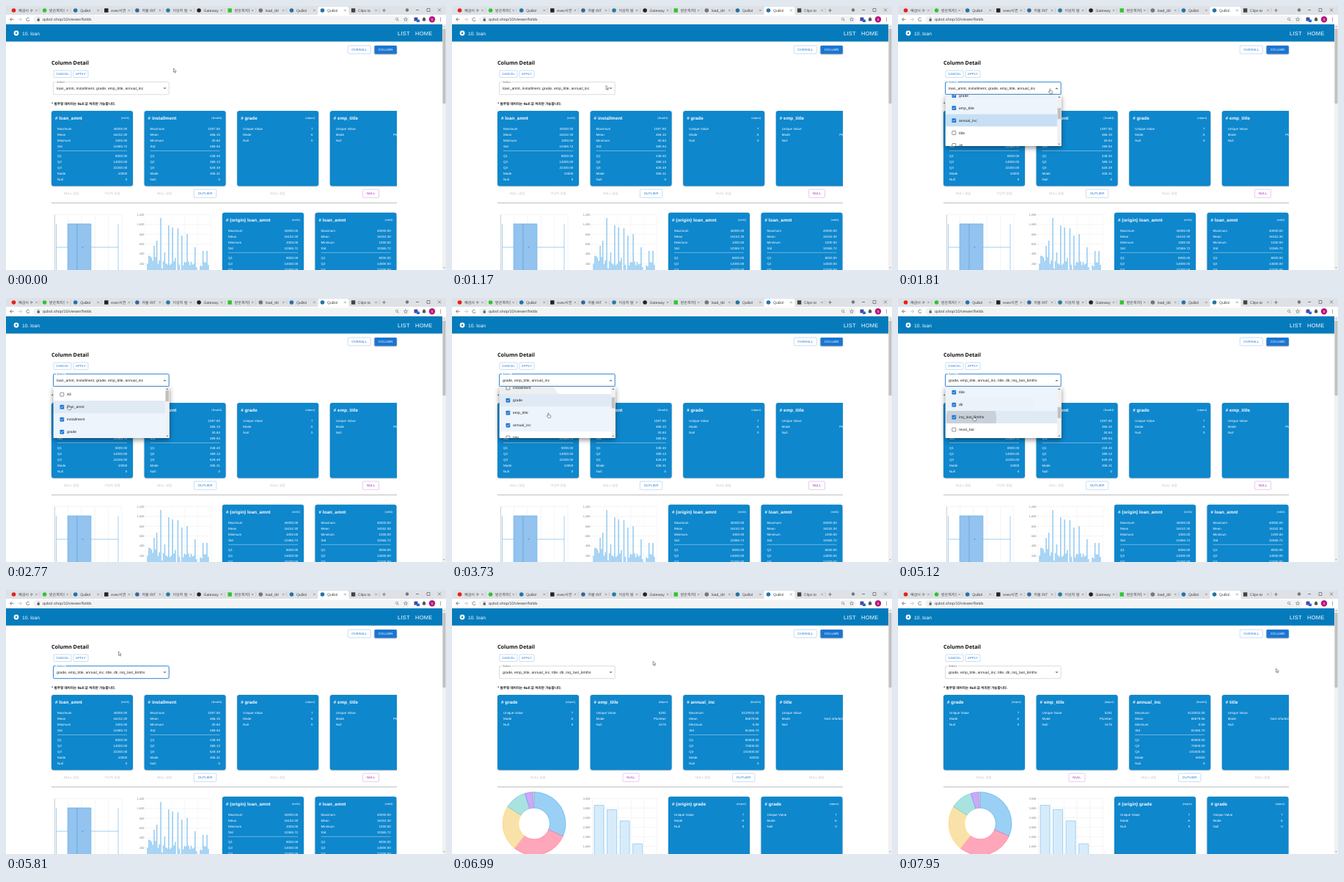
Recreate the animation shown at these times as an HTML page with a canvas. Size 600 by 360 pixels, loop 8 s.

```html
<!DOCTYPE html>
<html lang="ko">
<head>
<meta charset="utf-8">
<title>Column Detail</title>
<style>
html, body { margin: 0; width: 100%; height: 100%; overflow: hidden; background: #fff; }
canvas { display: block; width: 600px; height: 360px; }
</style>
</head>
<body>
<canvas id="stage"></canvas>
<script>
const canvas = document.getElementById('stage');
const ctx = canvas.getContext('2d');
const ratio = window.devicePixelRatio || 1;
canvas.width = 600 * ratio;
canvas.height = 360 * ratio;

const LOOP = 8000;
const SANS = '"Liberation Sans", "Noto Sans CJK KR", "Noto Sans CJK", sans-serif';
const CJK = '"Noto Sans CJK KR", "Noto Sans CJK", sans-serif';
const HEAD = '"Noto Sans", sans-serif';
const BLUE = '#1976d2', CARD = '#0e87cd', INK = '#222';
const CONTENT_RIGHT = 533;

// Timing of the session
const OPEN = 1660, CLOSE = 5420, BLUR = 6250, APPLY = 6900;
const CLICKS = [[2900, 1], [3350, 2], [4300, 6], [4620, 7], [4960, 8]];
const CURSOR = [
  [0, 230, 88], [500, 230, 88], [1400, 208, 116], [1900, 208, 116], [2400, 112, 142],
  [2700, 86, 149], [3000, 86, 149], [3250, 92, 166], [3430, 92, 166], [3720, 132, 160],
  [4200, 108, 129], [4340, 108, 129], [4520, 106, 146], [4700, 106, 146], [4880, 104, 164],
  [5140, 104, 164], [5400, 150, 90], [5820, 155, 87], [6120, 101, 93], [6500, 101, 93],
  [7600, 517, 110], [8000, 517, 110]
];
const SCROLL = [[0, 60.5], [2050, 60.5], [2500, 0], [3480, 0], [3680, 43], [3800, 43], [4150, 105], [8000, 105]];

const COLUMNS = ['All', 'loan_amnt', 'installment', 'grade', 'emp_title', 'annual_inc', 'title', 'dti',
  'inq_last_6mths', 'revol_bal', 'revol_util', 'total_acc', 'term', 'purpose', 'int_rate'];

const STATS = ['Maximum', 'Mean', 'Minimum', 'Std', 'Q1', 'Q2', 'Q3', 'Mode', 'Null'];
const KINDS = ['Unique Value', 'Mode', 'Null'];
const DATA = {
  loan_amnt: ['(int64)', '40000.00 16152.30 1000.00 10365.72 8000.00 14000.00 22200.00 10000 0'.split(' ')],
  installment: ['(float64)', '1597.80 466.10 30.84 289.94 248.40 389.13 628.49 306.31 0'.split(' ')],
  grade: ['(object)', ['7', 'A', '0']],
  emp_title: ['(object)', ['5281', 'Plumber', '1575']],
  annual_inc: ['(float64)', '5119032.00 85679.56 0.00 81465.70 60000.00 70000.00 101000.00 60000 0'.split(' ')],
  title: ['(object)', ['1204', 'Yard refurbishment', '0']]
};

const clamp = v => Math.max(0, Math.min(1, v));
const ease = v => v * v * (3 - 2 * v);

function track(keys, t) {
  let i = 0;
  while (i < keys.length - 2 && t >= keys[i + 1][0]) i++;
  const a = keys[i], b = keys[i + 1];
  const k = ease(clamp((t - a[0]) / (b[0] - a[0])));
  return a.slice(1).map((v, n) => v + (b[n + 1] - v) * k);
}

function rect(x, y, w, h, fill, r = 0) {
  ctx.fillStyle = fill;
  ctx.beginPath();
  ctx.roundRect(x, y, w, h, r);
  ctx.fill();
}

function frame(x, y, w, h, stroke, r = 0, width = 0.6) {
  ctx.strokeStyle = stroke;
  ctx.lineWidth = width;
  ctx.beginPath();
  ctx.roundRect(x, y, w, h, r);
  ctx.stroke();
}

function line(points, stroke, width = 0.6) {
  ctx.strokeStyle = stroke;
  ctx.lineWidth = width;
  ctx.beginPath();
  for (let i = 0; i < points.length; i += 2) ctx.lineTo(points[i], points[i + 1]);
  ctx.stroke();
}

function dot(x, y, r, fill) {
  ctx.fillStyle = fill;
  ctx.beginPath();
  ctx.arc(x, y, r, 0, 7);
  ctx.fill();
}

// y is the middle of the capitals
function text(str, x, y, size, color, { align = 'left', bold = false, font = SANS, space = 0.01 } = {}) {
  ctx.font = `${bold ? 'bold ' : ''}${size}px ${font}`;
  ctx.letterSpacing = size * space + 'px';
  ctx.textRendering = 'geometricPrecision';
  ctx.textAlign = align;
  ctx.fillStyle = color;
  ctx.fillText(str, x, y + size * 0.36);
}

function clipped(x, y, w, h, paint) {
  ctx.save();
  ctx.beginPath();
  ctx.rect(x, y, w, h);
  ctx.clip();
  paint();
  ctx.restore();
}

function shadowed(blur, dy, alpha, paint) {
  ctx.save();
  ctx.shadowColor = `rgba(0,0,0,${alpha})`;
  ctx.shadowBlur = blur * ratio;
  ctx.shadowOffsetY = dy * ratio;
  paint();
  ctx.restore();
}

function button(label, x, y, w, h, size, { color = BLUE, filled = false } = {}) {
  if (filled) shadowed(2, 0.7, 0.4, () => rect(x, y, w, h, color, 1.3));
  else frame(x, y, w, h, color === BLUE ? '#a3c8ed' : '#d7a8df', 1.3);
  text(label, x + w / 2, y + h / 2, size, filled ? '#fff' : color, { align: 'center', space: 0.028 });
}

function browser() {
  rect(0, 0, 600, 12, '#dee1e6');
  const tabs = [['예금시 수', '#e62117'], ['받은쪽지함', '#2fc52f'], ['QuBol', '#2373a8'], ['exec시연', '#222'],
    ['자율 RIT', '#34679a'], ['이상치 탐', '#277da1'], ['Gateway', '#222'], ['받은쪽지함', '#2fc52f'],
    ['load_tbl', '#77767d'], ['QuBol', '#2373a8'], ['QuBol', '#2373a8'], ['Clips to', '#444']];
  tabs.forEach(([label, color], i) => {
    const x = 10.5 + i * 42.1;
    if (i === 10) rect(x - 6, 1, 42, 12, '#fff', [2.5, 2.5, 0, 0]);
    else if (i !== 9) line([x + 35.5, 3, x + 35.5, 9], '#a9adb3', 0.4);
    if (i % 4 === 3) rect(x - 2.7, 3.2, 5.4, 5.6, color, 0.5);
    else dot(x, 6, 2.8, color);
    clipped(x + 6, 0, 21, 12, () => text(label, x + 6.5, 6, 5, '#3c4043'));
    cross(x + 31, 6, 1.3, '#5f6368');
  });
  line([513, 6, 518, 6], '#444');
  line([515.5, 3.5, 515.5, 8.5], '#444');
  dot(547, 5.5, 2.2, '#777');
  line([559, 5.5, 563, 5.5], '#333');
  frame(574, 3.5, 4, 4, '#333', 0, 0.5);
  cross(591, 5.5, 2, '#333');

  rect(0, 12, 600, 13, '#fff');
  rect(37, 13.5, 514, 9.6, '#f1f3f4', 5);
  arrowIcon(8, 18.3, -1, '#555');
  arrowIcon(19, 18.3, 1, '#b8b8b8');
  ctx.strokeStyle = '#555';
  ctx.lineWidth = 0.7;
  ctx.beginPath();
  ctx.arc(30, 18.3, 2.2, 0.3, 5.6);
  ctx.stroke();
  rect(42.6, 17.7, 3.2, 2.7, '#555', 0.3);
  frame(43.3, 16, 1.8, 2.4, '#555', 0.9, 0.5);
  text('qubol.shop/10/viewer/fields', 50, 18.3, 5.4, '#444');
  ctx.beginPath();
  ctx.arc(533, 17.8, 1.6, 0, 7);
  ctx.stroke();
  line([534.2, 19, 535.6, 20.5], '#555');
  star(545, 18.3);
  rect(556.5, 15.5, 5, 5, '#4b45a8', 0.6);
  rect(560, 18.5, 4, 3.6, '#2468d6', 0.5);
  rect(568, 16.5, 4.2, 4, '#555', 0.8);
  dot(570, 16.2, 1, '#555');
  dot(581, 18.3, 4.2, '#b5157e');
  text('S', 581, 18.3, 4.5, '#fff', { align: 'center' });
  for (let i = -1; i < 2; i++) dot(592.5, 18.3 + i * 2, 0.6, '#555');
}

function cross(x, y, r, color) {
  line([x - r, y - r, x + r, y + r], color, 0.5);
  line([x + r, y - r, x - r, y + r], color, 0.5);
}

function arrowIcon(x, y, dir, color) {
  line([x - 2.5 * dir, y, x + 2.5 * dir, y], color, 0.7);
  line([x, y - 2.3, x + 2.5 * dir, y, x, y + 2.3], color, 0.7);
}

function star(x, y) {
  ctx.beginPath();
  for (let i = 0; i < 10; i++) {
    const r = i % 2 ? 1.2 : 2.7, a = i * Math.PI / 5;
    ctx.lineTo(x + r * Math.sin(a), y - r * Math.cos(a));
  }
  ctx.closePath();
  ctx.strokeStyle = '#555';
  ctx.lineWidth = 0.5;
  ctx.stroke();
}

function pageTop() {
  rect(0, 25, 595, 23.5, '#057bbc');
  dot(14, 37, 3.4, '#fff');
  dot(14, 37, 1.2, '#057bbc');
  text('10. loan', 22, 37.3, 6.6, '#fff');
  text('LIST', 534, 37, 7.5, '#fff', { space: 0.03 });
  text('HOME', 558, 37, 7.5, '#fff', { space: 0.03 });
  rect(595, 25, 5, 335, '#f1f1f1');
  rect(595.5, 31, 4, 102, '#c1c1c1');
  triangle(597.5, 28, -1.2, '#777');
  triangle(597.5, 357, 1.2, '#777');

  button('OVERALL', 466.3, 54, 31, 11, 4.375);
  button('COLUMN', 502.5, 54, 30.3, 11.3, 4.375, { filled: true });
  text('Column Detail', 62, 77, 7.2, '#111', { bold: true, font: HEAD, space: 0 });
  button('CANCEL', 65, 88, 24, 9.5, 4.2);
  button('APPLY', 92, 88, 20, 9.5, 4.2);
  text('* 범주형 데이터는 Null 값 처리만 가능합니다.', 62, 133, 4.55, '#111', { bold: true, font: CJK, space: 0 });
}

function triangle(x, y, h, color) {
  const w = Math.abs(h) * 1.25;
  ctx.fillStyle = color;
  ctx.beginPath();
  ctx.moveTo(x - w, y - h / 2);
  ctx.lineTo(x + w, y - h / 2);
  ctx.lineTo(x, y + h / 2);
  ctx.fill();
}

function select(t, chosen) {
  const focus = t >= OPEN - 30 && t < BLUR;
  const open = t >= OPEN && t < CLOSE;
  frame(64.5, 103.7, 157.7, 17, focus ? BLUE : '#c4c4c4', 1.4, focus ? 0.9 : 0.6);
  rect(67.8, 102, 13.5, 3, '#fff');
  text('Select', 69, 103.2, 3.8, focus ? BLUE : '#666');
  text(chosen.map(i => COLUMNS[i]).join(', '), 69, 112, 5, INK);
  triangle(216.5, 112.3, open ? -1.8 : 1.8, '#666');
}

function card(x, y, name, prefix = '') {
  const [type, values] = DATA[name];
  const labels = values.length > 3 ? STATS : KINDS;
  shadowed(2, 0.6, 0.3, () => rect(x, y, 111, 102.5, CARD, 3));
  text('# ' + prefix + name, x + 5, y + 9.9, 6.25, '#fff', { bold: true, space: 0.0075 });
  text(type, x + 106, y + 10, 3.8, '#fff', { align: 'right' });
  labels.forEach((label, i) => {
    const row = y + 24.3 + i * 8.05 + (i > 3 ? 4.6 : 0);
    text(label, x + 8, row, 4.45, '#fff');
    text(values[i], x + 103.3, row, 4.45, '#fff', { align: 'right' });
  });
  if (labels === STATS) line([x + 8, y + 54.5, x + 103, y + 54.5], '#a9d6ef', 0.6);
}

function disabled(label, x) {
  text(label, x, 255.7, 4.4, '#c2c2c2', { align: 'center' });
}

function cards(applied) {
  const names = applied ? ['grade', 'emp_title', 'annual_inc', 'title'] : ['loan_amnt', 'installment', 'grade', 'emp_title'];
  const none = 'NULL 없음';
  clipped(0, 136, CONTENT_RIGHT, 224, () => {
    names.forEach((name, i) => card(62 + i * 126.6, 143, name));
    ['(origin) ', ''].forEach((prefix, i) => card(295 + i * 126.5, 281.8, names[0], prefix));
  });
  const nullButton = x => button('NULL', x, 250, 22, 11.3, 4.375, { color: '#9c27b0' });
  const outlier = x => button('OUTLIER', x, 250, 30.5, 11.3, 4.375);
  if (applied) {
    disabled(none, 117.5);
    nullButton(233);
    disabled(none, 342);
    outlier(382.5);
    disabled(none, 497);
  } else {
    disabled(none, 89);
    disabled('이상치 없음', 145);
    disabled(none, 216);
    outlier(256.3);
    disabled(none, 370.5);
    nullButton(486.5);
  }
  line([62, 268.6, CONTENT_RIGHT, 268.6], '#bcbcbc', 1);
}

function axis(top, step, gap) {
  for (let i = 0; i < 6; i++) {
    const y = 284.5 + i * gap;
    text((top - i * step).toLocaleString('en-US'), 188.5, y, 3.8, '#777', { align: 'right' });
    line([189.5, y, 279.5, y], '#e6e6e6', 0.4);
  }
}

function boxPlot() {
  for (let i = 0; i < 6; i++) line([66.5 + i * 18.3, 284.5, 66.5 + i * 18.3, 360], '#e4e4e4', 0.4);
  line([66.5, 284.5, 158, 284.5], '#e4e4e4', 0.4);
  line([66.5, 284.5, 66.5, 360], '#aaa', 0.5);
  const edge = '#5fb0e8';
  line([68.5, 297, 68.5, 360], edge);
  line([153, 297, 153, 360], edge);
  line([68.5, 329, 153, 329], edge);
  rect(84, 297, 32, 70, '#93c3ee');
  frame(84, 297, 32, 70, edge);
  line([97, 297, 97, 360], '#4a9cd8');
  dot(104.5, 329, 0.9, '#5a9fd4');
}

function histogram() {
  axis(1200, 200, 13.35);
  for (let i = 0; i < 6; i++) line([190 + i * 17.9, 284.5, 190 + i * 17.9, 360], '#eee', 0.4);
  const peaks = { 2: 341, 5: 327, 7: 320, 10: 289, 13: 336, 16: 299, 19: 302, 23: 303, 26: 313, 30: 311, 36: 329, 42: 334, 45: 334 };
  let seed = 17;
  for (let i = 0; i < 48; i++) {
    seed = (seed * 1103 + 377) % 4096;
    const y = peaks[i] || 340 + i * 0.16 + seed / 4096 * 17;
    rect(192.3 + i * 1.8, y, 1.5, 365 - y, '#93caf1');
  }
}

function donut() {
  const parts = [[3150, '#9ad0f5', '#36a2eb'], [2920, '#ffa7ba', '#ff6384'], [2330, '#f9e2a9', '#ffcd56'],
    [1130, '#a9e3df', '#4bc0c0'], [400, '#c9a9fb', '#9966ff'], [70, '#ccd', '#aab']];
  let a = -Math.PI / 2;
  for (const [value, fill, stroke] of parts) {
    const b = a + value / 10000 * Math.PI * 2;
    ctx.beginPath();
    ctx.arc(112, 333 - 14.5, 43, a, b);
    ctx.arc(112, 333 - 14.5, 21.3, b, a, true);
    ctx.closePath();
    ctx.fillStyle = fill;
    ctx.strokeStyle = stroke;
    ctx.lineWidth = 0.5;
    ctx.fill();
    ctx.stroke();
    a = b;
  }
}

function bars() {
  axis(3500, 500, 13);
  for (let i = 0; i < 6; i++) line([191.5 + i * 17.55, 284.5, 191.5 + i * 17.55, 360], '#e6e6e6', 0.4);
  [3150, 2920, 2330, 1130].forEach((value, i) => {
    const y = 284.5 + (3500 - value) * 0.026;
    rect(194 + i * 17.55, y, 13, 370 - y, '#d7ecfb');
    frame(194 + i * 17.55, y, 13, 370 - y, '#6fbcf0', 0, 0.6);
  });
}

function checkbox(x, y, on) {
  if (!on) return frame(x + 0.3, y - 2.5, 5, 5, '#666', 0.6, 0.7);
  rect(x, y - 2.8, 5.7, 5.7, BLUE, 0.7);
  line([x + 1.2, y, x + 2.4, y + 1.3, x + 4.6, y - 1.2], '#fff', 0.75);
}

function menu(t, chosen, cursor) {
  const alpha = clamp((t - OPEN) / 90) * clamp((CLOSE + 90 - t) / 90);
  if (!alpha) return;
  const scroll = track(SCROLL, t)[0];
  let hover = Math.floor((cursor[1] - 123 + scroll) / 17);
  if (t > 3480 && t < 3800) hover = 3;
  const inside = cursor[1] > 122 && cursor[1] < 191;

  ctx.save();
  ctx.globalAlpha = alpha;
  shadowed(7, 2.5, 0.45, () => rect(64.7, 121, 158, 70, '#fff', 1.3));
  clipped(64.7, 121, 152.5, 70, () => {
    COLUMNS.forEach((label, i) => {
      const y = 131.5 + i * 17 - scroll;
      if (y < 110 || y > 202) return;
      const on = chosen.includes(i);
      let fill = on ? '#edf4fb' : '#fff';
      if (inside && i === hover) fill = on ? '#e0eaf5' : '#f3f5f7';
      if (!inside && i === 5 && t < 2300) fill = '#c6dff4';
      rect(64.7, y - 8.5, 153, 17, fill);
      ripples(t, i, y);
      checkbox(73.5, y, on);
      text(label, 83, y, 5, INK);
    });
  });
  rect(217.2, 121, 5.4, 70, '#f1f1f1');
  rect(217.6, 126.2 + scroll * 0.215, 4.6, 15, '#c1c1c1');
  triangle(219.9, 124, -1.3, '#555');
  triangle(219.9, 188.3, 1.3, '#555');
  ctx.restore();
}

function ripples(t, row, y) {
  for (const [start, index] of CLICKS) {
    const age = t - start;
    if (index !== row || age < 0 || age > 520) continue;
    const [x, cy] = track(CURSOR, start);
    const fade = 0.11 * clamp((520 - age) / 250);
    clipped(64.7, y - 8.5, 152.5, 17, () => dot(x - 4, cy, 10 + age * 0.15, `rgba(0,0,0,${fade})`));
  }
}

function pointer(t, [x, y]) {
  const hand = (t > 1320 && t < 5270) || (t > 6040 && t < 6580);
  ctx.save();
  ctx.translate(x, y);
  ctx.fillStyle = '#fff';
  ctx.strokeStyle = '#333';
  ctx.lineWidth = 0.5;
  ctx.lineJoin = 'round';
  const shape = hand
    ? 'M-1.2-2.6 Q-.6-3.5 0-2.6 L0-.5 L2.2 0 Q3 .3 2.8 1.2 L2.2 3.5 L-.8 3.5 L-2.8 .9 Q-2.4 0-1.2 .9Z'
    : 'M-1.5-3 L-1.5 2.3 L-.3 1.2 L.6 3.1 L1.5 2.7 L.6 .9 L2.3 .8Z';
  const path = new Path2D(shape);
  ctx.fill(path);
  ctx.stroke(path);
  ctx.restore();
}

function draw(t) {
  ctx.setTransform(ratio, 0, 0, ratio, 0, 0);
  rect(0, 0, 600, 360, '#fff');
  const applied = t >= APPLY;
  const chosen = new Set([1, 2, 3, 4, 5]);
  for (const [start, index] of CLICKS) {
    if (t >= start && !chosen.delete(index)) chosen.add(index);
  }
  const picked = [...chosen];
  const cursor = track(CURSOR, t);
  browser();
  pageTop();
  select(t, picked);
  cards(applied);
  if (applied) {
    donut();
    bars();
  } else {
    boxPlot();
    histogram();
  }
  menu(t, picked, cursor);
  pointer(t, cursor);
}

const begin = performance.now();
function tick() {
  draw((performance.now() - begin) % LOOP);
  requestAnimationFrame(tick);
}
tick();
</script>
</body>
</html>
```
